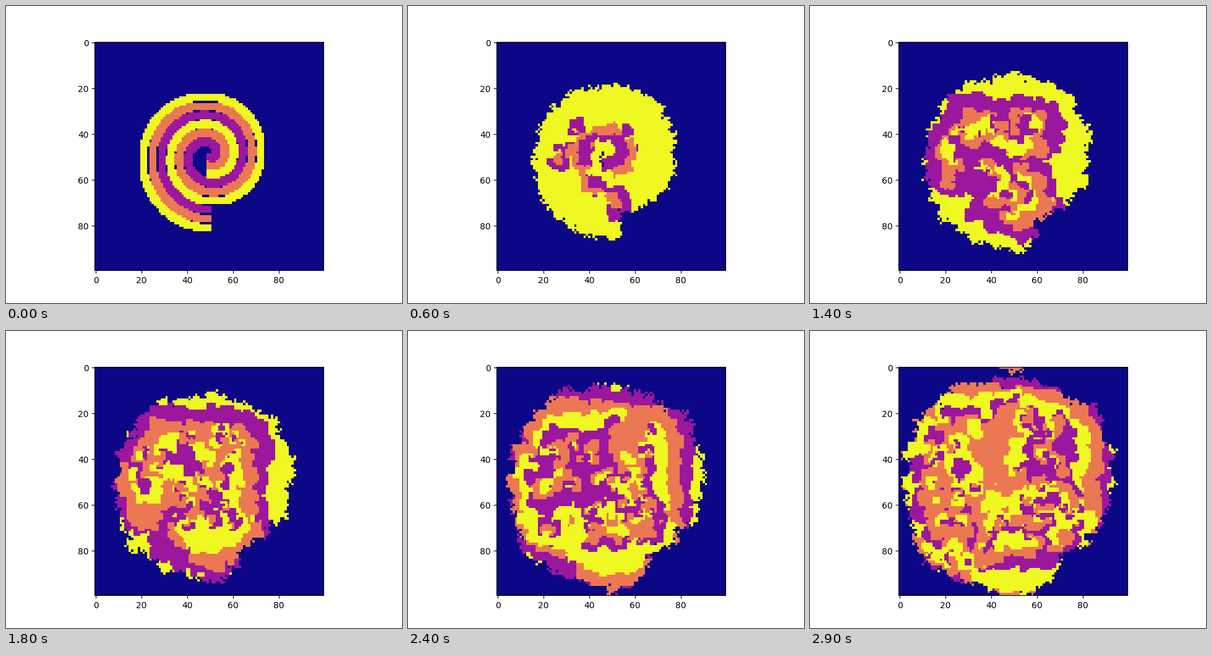
Animation of 640x480 px, one loop 3 s. Source, as a matplotlib script:

```python
import math

import matplotlib.pyplot as plt
import numpy as np
from matplotlib.animation import FuncAnimation

SIZE = 100
FRAMES = 30
INTERVAL = 100
SPREAD_CHANCE = 0.16
HUNT_CHANCE = 0.3
HUNTS_PER_FRAME = 2
AROUND = [(dy, dx) for dy in (-1, 0, 1) for dx in (-1, 0, 1) if dy or dx]


def spiral_grid():
    """Three nested spiral arms, two turns each, drawn with a 3x3 brush."""
    grid = np.zeros((SIZE, SIZE), dtype=int)
    for species in (3, 2, 1):
        start = 4 * (species - 1) - 0.095
        for t in np.linspace(0, 4 * math.pi, 4000):
            r = max(0, start + 6 * t / math.pi)
            x = int(50 + r * math.sin(t))
            y = int(50 + r * math.cos(t))
            grid[y - 1:y + 2, x - 1:x + 2] = species
    return grid


def spread(grid, rng):
    """Occupied cells settle some of the free cells around them."""
    result = grid.copy()
    for shift in rng.permutation(AROUND):
        settler = np.roll(grid, tuple(shift), axis=(0, 1))
        lucky = rng.random(grid.shape) < SPREAD_CHANCE
        result = np.where((result == 0) & lucky, settler, result)
    return result


def hunt(grid, rng):
    """Some cells overrun all of their prey in the block around them."""
    hunters = np.where(rng.random(grid.shape) < HUNT_CHANCE, grid, 0)
    prey = np.array([-1, 3, 1, 2])  # indexed by hunter
    result = grid.copy()
    for shift in AROUND:
        hunter = np.roll(hunters, shift, axis=(0, 1))
        result = np.where(grid == prey[hunter], hunter, result)
    return result


def simulate():
    rng = np.random.default_rng(4)
    grids = [spiral_grid()]
    for _ in range(FRAMES - 1):
        grid = spread(grids[-1], rng)
        for _ in range(HUNTS_PER_FRAME):
            grid = hunt(grid, rng)
        grids.append(grid)
    return grids


grids = simulate()
fig, ax = plt.subplots(figsize=(6.4, 4.8), dpi=100)
image = ax.imshow(grids[0], cmap="plasma", vmin=0, vmax=3,
                  interpolation="nearest")


def draw(frame):
    image.set_data(grids[frame])
    return [image]


anim = FuncAnimation(fig, draw, frames=FRAMES, interval=INTERVAL,
                     repeat=True, repeat_delay=0)
plt.show()
```
